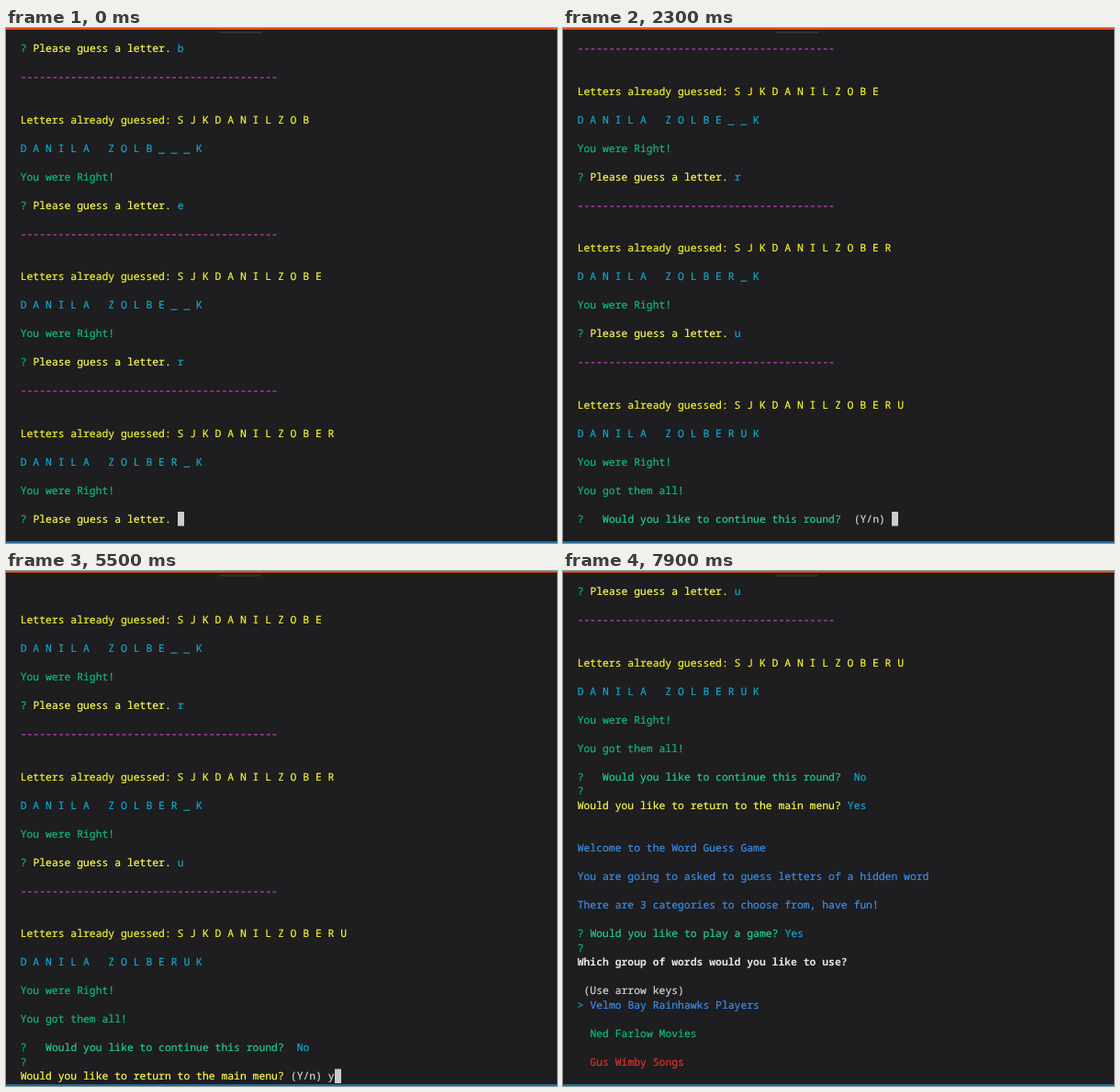
Animation of 600 by 560 pixels, one loop 8 s. Source, as an HTML page:

```html
<!DOCTYPE html>
<html lang="en">
<head>
<meta charset="utf-8">
<title>Word Guess Game</title>
<style>
  html, body { margin: 0; width: 100%; height: 100%; overflow: hidden; background: #1e1d1f; }
  svg { display: block; width: 600px; height: 560px; }
  text {
    font: 11.4px "Noto Sans Mono", "DejaVu Sans Mono", monospace;
    text-rendering: geometricPrecision;
    white-space: pre;
    stroke-width: 0.2px;
  }
  .bold { font-weight: 600; stroke: none; }
</style>
</head>
<body>
<svg viewBox="0 0 600 560">
  <rect width="600" height="560" fill="#1e1d1f"/>
  <rect width="600" height="1.8" fill="#ee5019"/>
  <rect x="232" y="4.5" width="46" height="1" fill="#48474a"/>
  <rect y="558" width="600" height="2" fill="#176f9e"/>
  <g id="screen"></g>
</svg>
<script>
const NS = "http://www.w3.org/2000/svg";
const LOOP = 8000, LEFT = 15.7, CELL = 6.84, ROW = 15.5, TOP = 14.5, BASE = 11.8;
const C = {
  green: "#0dbc79", lime: "#23d18b", yellow: "#f5f52c", lemon: "#fbfb50",
  cyan: "#11a8cd", blue: "#3b8eea", pink: "#c542c5", red: "#dc342c",
  white: "#d6d6d6", bright: "#e5e5e5"
};
const NAME = "DANILA ZOLBERUK", GUESSES = "SJKDANILZOBERU";

// Each step: start time in ms and the first buffer line in view.
const STEPS = [
  [0, 0],      // waiting for a letter
  [100, 0],    // letter typed
  [400, 13],   // round won
  [2900, 13],  // "n" typed
  [3900, 14],  // main menu question
  [4800, 14],  // "y" typed
  [5600, 24],  // welcome
  [7300, 24],  // "y" typed
  [7600, 33]   // category list
];

const part = (str, color, bold) => ({ str, color, bold });
const line = (str, color, bold) => [part(str, color, bold)];
const cursor = { cursor: true };

// A question shows its hint and typed key until it is answered.
function ask(parts, hint, key, answer, step, at) {
  if (step >= at + 2) return [...parts, part(answer, C.cyan)];
  return [...parts, part(hint + (step > at ? key : ""), C.white), cursor];
}

const letterAsk = [part("? ", C.green), part("Please guess a letter. ", C.lemon)];

function buffer(step) {
  const doc = [];
  const round = (at, count) => {
    const known = GUESSES.slice(0, count);
    const word = [...NAME].map(c => c === " " || known.includes(c) ? c : "_").join(" ");
    doc[at] = line("-".repeat(41), C.pink);
    doc[at + 3] = line("Letters already guessed: " + [...known].join(" "), C.yellow);
    doc[at + 5] = line(word, C.cyan);
    doc[at + 7] = line("You were Right!", C.green);
  };

  for (let i = 0; i < 3; i++) {
    doc[i * 11] = [...letterAsk, part(GUESSES[10 + i].toLowerCase(), C.cyan)];
    round(i * 11 + 2, 11 + i);
  }
  doc[33] = ask(letterAsk, "", "u", "u", step, 0);

  if (step >= 2) {
    round(35, 14);
    doc[44] = line("You got them all!", C.green);
    doc[46] = ask([part("?   ", C.green), part("Would you like to continue this round?  ", C.lime)],
      "(Y/n) ", "n", "No", step, 2);
  }
  if (step >= 4) {
    doc[47] = line("?", C.green);
    doc[48] = ask(line("Would you like to return to the main menu? ", C.lemon),
      "(Y/n) ", "y", "Yes", step, 4);
  }
  if (step >= 6) {
    doc[51] = line("Welcome to the Word Guess Game", C.blue);
    doc[53] = line("You are going to asked to guess letters of a hidden word", C.blue);
    doc[55] = line("There are 3 categories to choose from, have fun!", C.blue);
    doc[57] = ask([part("? ", C.green), part("Would you like to play a game? ", C.lime)],
      "(Y/n) ", "y", "Yes", step, 6);
  }
  if (step >= 8) {
    doc[58] = line("?", C.green);
    doc[59] = line("Which group of words would you like to use?", C.bright, true);
    doc[61] = line(" (Use arrow keys)", C.white);
    doc[62] = [part("> ", C.cyan), part("Velmo Bay Rainhawks Players", C.blue)];
    doc[64] = line("  Ned Farlow Movies", C.green);
    doc[66] = line("  Gus Wimby Songs", C.red);
  }
  return doc;
}

function add(parent, tag, attrs, str) {
  const el = document.createElementNS(NS, tag);
  for (const k in attrs) el.setAttribute(k, attrs[k]);
  if (str) el.textContent = str;
  parent.appendChild(el);
}

const screen = document.getElementById("screen");

function draw(step) {
  screen.replaceChildren();
  const first = STEPS[step][1];
  buffer(step).slice(first).forEach((parts, row) => {
    let col = 0;
    const y = TOP + row * ROW;
    for (const p of parts) {
      if (p.cursor) {
        add(screen, "rect", { x: LEFT + col * CELL + 0.3, y, width: 7, height: 15.5, fill: "#cccccc" });
        continue;
      }
      // Skip leading blanks so every run starts on its own cell.
      const str = p.str.trim(), lead = p.str.length - p.str.trimStart().length;
      if (str) {
        add(screen, "text", {
          x: LEFT + (col + lead) * CELL, y: y + BASE,
          fill: p.color, stroke: p.color, class: p.bold ? "bold" : ""
        }, str);
      }
      col += p.str.length;
    }
  });
}

let shown = -1;
function tick() {
  const t = performance.now() % LOOP;
  const step = STEPS.findLastIndex(s => s[0] <= t);
  if (step !== shown) draw(shown = step);
  requestAnimationFrame(tick);
}
tick();
</script>
</body>
</html>
```
